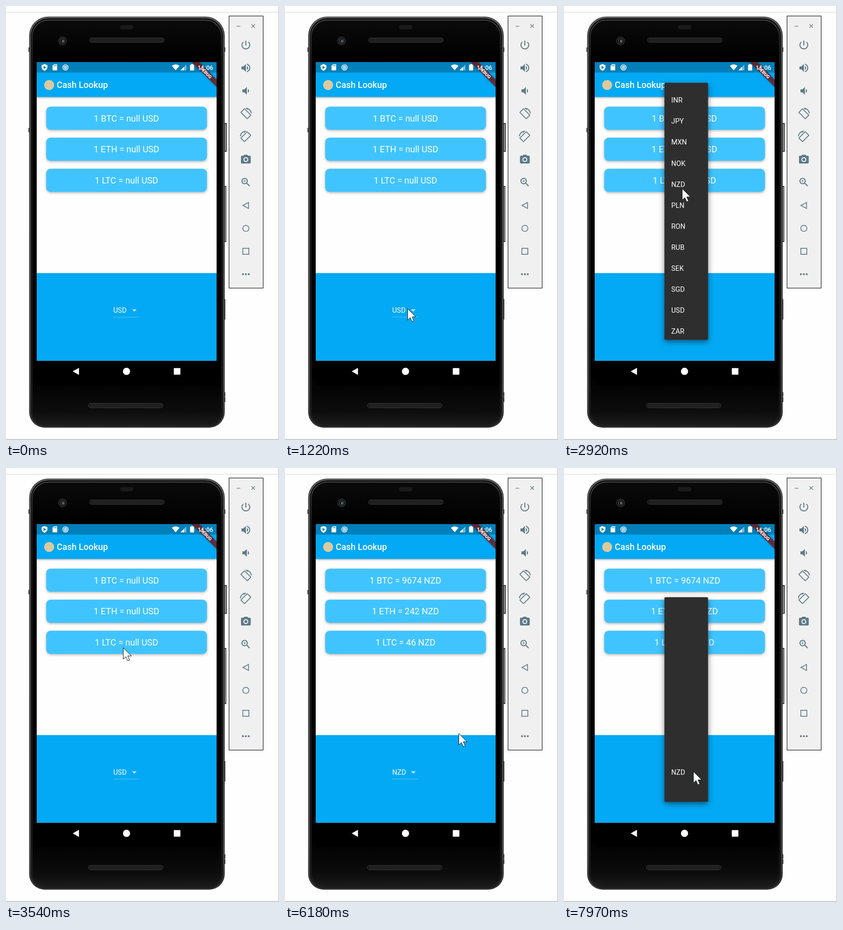
Recreate the animation shown at these times as an HTML page with a canvas. Size 560 by 890 pixels, loop 8000 ms.

```html
<!DOCTYPE html>
<html lang="en">
<head>
<meta charset="utf-8">
<title>Currency app</title>
<style>
html, body { margin: 0; width: 100%; height: 100%; overflow: hidden; background: #fefefe; }
canvas { display: block; }
</style>
</head>
<body>
<canvas id="stage" width="560" height="890"></canvas>
<script>
const W = 560, H = 890, LOOP = 8000, TAU = Math.PI * 2;
const view = document.getElementById('stage').getContext('2d');
const backdrop = document.createElement('canvas');
backdrop.width = W;
backdrop.height = H;
let c = backdrop.getContext('2d');

const BLUE = '#03a9f4', SLATE = '#5c7b88', PANEL = '#2e2e2e';
const CODES = ['INR', 'JPY', 'MXN', 'NOK', 'NZD', 'PLN', 'RON', 'RUB', 'SEK', 'SGD', 'USD', 'ZAR'];
const ROW = 43.1, CARD_GAP = 63.7;

function rect(x, y, w, h, color) {
  c.fillStyle = color;
  c.fillRect(x, y, w, h);
}
function round(x, y, w, h, r, color) {
  c.beginPath();
  c.roundRect(x, y, w, h, r);
  c.fillStyle = color;
  c.fill();
}
function disc(x, y, r, color) {
  c.beginPath();
  c.arc(x, y, r, 0, TAU);
  c.fillStyle = color;
  c.fill();
}
function ring(x, y, r, color, width) {
  c.beginPath();
  c.arc(x, y, r, 0, TAU);
  c.strokeStyle = color;
  c.lineWidth = width;
  c.stroke();
}
function poly(points, fill, stroke, width = 1) {
  c.beginPath();
  points.forEach(([x, y]) => c.lineTo(x, y));
  c.closePath();
  if (fill) { c.fillStyle = fill; c.fill(); }
  if (stroke) { c.strokeStyle = stroke; c.lineWidth = width; c.stroke(); }
}
function line(x1, y1, x2, y2, color, width) {
  c.beginPath();
  c.moveTo(x1, y1);
  c.lineTo(x2, y2);
  c.strokeStyle = color;
  c.lineWidth = width;
  c.stroke();
}
function text(str, x, y, size, align = 'left', weight = 400) {
  c.font = `${weight} ${size}px Roboto, sans-serif`;
  c.textAlign = align;
  c.fillStyle = '#fff';
  c.fillText(str, x, y);
}
function ramp(x1, y1, x2, y2, ...stops) {
  const g = c.createLinearGradient(x1, y1, x2, y2);
  stops.forEach(([at, color]) => g.addColorStop(at, color));
  return g;
}
function at(x, y, draw, angle = 0) {
  c.save();
  c.translate(x, y);
  c.rotate(angle);
  draw();
  c.restore();
}
function shadowed(color, blur, dy, draw) {
  c.save();
  c.shadowColor = color;
  c.shadowBlur = blur;
  c.shadowOffsetY = dy;
  draw();
  c.restore();
}

function grille(x, y) {
  round(x, y, 154, 10, 5, '#3c3c3c');
  round(x + 1, y + 1, 152, 8, 4, '#161616');
  for (let j = 0; j < 3; j++)
    for (let i = 0; i < 49; i++)
      rect(x + 4 + i * 3 + (j % 2) * 1.5, y + 2 + j * 2.4, 1.4, 1.2, '#3f3f3f');
}

function drawPhone() {
  // side buttons and antenna breaks
  round(447, 240, 6, 59, 1, '#3b3b3b');
  rect(449, 242, 2.5, 55, '#959595');
  round(447, 369, 5, 115, 1, '#3b3b3b');
  rect(449, 371, 2, 111, '#909090');
  rect(447, 601, 3, 42, '#444');
  rect(447, 802, 3, 10, '#444');
  [85, 250].forEach(y => rect(46, y, 5, 9, '#4a4a4a'));
  [85, 792].forEach(y => rect(445, y, 5, 9, '#4a4a4a'));

  round(47.5, 21.8, 401.2, 843, [39, 39, 32, 32], '#2c2c2c');
  round(48.5, 22.8, 399.2, 841, [38, 38, 31, 31], ramp(0, 23, 0, 864,
    [0, '#626262'], [.05, '#505050'], [.9, '#484848'], [1, '#333']));
  round(51, 25, 394.2, 837, [36, 36, 29, 29], '#1b1b1b');
  round(52.5, 26.5, 391.2, 834, [34, 34, 28, 28], ramp(0, 26, 0, 862,
    [0, '#0b0b0b'], [.1, '#000'], [.88, '#000'], [.96, '#0c0c0c'], [1, '#1c1c1c']));
  c.beginPath();
  c.roundRect(54, 29, 388, 830, [33, 33, 26, 26]);
  c.strokeStyle = ramp(0, 29, 0, 130, [0, '#777'], [.3, '#444'], [1, '#222']);
  c.lineWidth = 1.2;
  c.stroke();

  round(234, 39, 27, 9, 4, '#1a1a1a');
  disc(116, 71.5, 9, '#2b2b2b');
  disc(116, 71.5, 7, '#0d0f10');
  ring(116, 71.5, 4.5, '#39444a', 1.5);
  disc(117, 72, 2.4, '#5b6a70');
  grille(171, 65);
  grille(168.5, 814.5);
}

function drawStatus() {
  rect(63, 115, 369, 21.5, '#027fb8');
  // shield, card and sync dot
  at(79, 126, () => {
    c.beginPath();
    c.moveTo(0, -7);
    c.lineTo(6, -4.5);
    c.lineTo(6, 0);
    c.quadraticCurveTo(5, 5, 0, 7);
    c.quadraticCurveTo(-5, 5, -6, 0);
    c.lineTo(-6, -4.5);
    c.fillStyle = '#fff';
    c.fill();
    poly([[-2, -3.2], [3.4, 0], [-2, 3.2]], '#027fb8');
  });
  poly([[98.5, 119.5], [105, 119.5], [105, 132], [95.5, 132], [95.5, 122.5]], '#fff');
  for (let i = 0; i < 3; i++) rect(98.3 + i * 2.1, 121, 1.1, 2.6, '#027fb8');
  disc(122, 126, 6.3, '#e6f3f9');
  ring(122, 126, 4.3, '#4b9ccb', 1.6);
  disc(122, 126, 3, '#a9d2e8');
  // wifi, signal, battery
  c.beginPath();
  c.moveTo(348, 132);
  c.lineTo(340.2, 122.6);
  c.quadraticCurveTo(348, 117, 355.8, 122.6);
  c.fillStyle = '#fff';
  c.fill();
  poly([[358, 132], [370, 132], [370, 120]], '#73b9da');
  poly([[358, 132], [365, 132], [365, 125]], '#fff');
  rect(380, 119, 3.6, 2, '#fff');
  round(377.5, 120.2, 8.5, 12, 1, '#fff');
}

function drawBanner() {
  c.save();
  c.beginPath();
  c.rect(63, 115, 369, 72);
  c.clip();
  at(432, 115, () => {
    shadowed('rgba(0,0,0,.5)', 5, 0, () => rect(-36, 25.2, 72, 10.8, 'rgba(0,0,0,.5)'));
    rect(-36, 25.2, 72, 10.8, 'rgba(183,28,28,.5)');
    text('DEBUG', 0, 34, 9.15, 'center', 900);
  }, Math.PI / 4);
  c.restore();
}

function drawApp() {
  rect(63, 115, 369, 613, '#fefefe');
  shadowed('rgba(0,0,0,.34)', 4, 1.5, () => rect(63, 136, 369, 50.5, BLUE));
  drawStatus();
  disc(88.5, 162, 10.3, '#dcca9d');
  text('Cash Lookup', 104, 168, 18, 'left', 500);
  for (let i = 0; i < 3; i++)
    shadowed('rgba(0,0,0,.3)', 5, 1.8, () =>
      round(82.5, 206.4 + i * CARD_GAP, 329.7, 47.4, 9, '#40c4ff'));
  rect(63, 547.7, 369, 180, BLUE);
  poly([[258.5, 622], [268, 622], [263.2, 626.8]], '#c2e8fb');
  rect(220, 637.5, 54, 1, '#5fbfec');
  drawBanner();
  text('11:06', 393, 130.5, 12.6, 'left', 500);

  rect(63, 727.6, 369, 50, '#000');
  poly([[136.8, 749.2], [149.7, 742], [149.7, 756.5]], '#fff');
  disc(247.2, 749.2, 7.4, '#fff');
  round(344.2, 742.5, 13.5, 13.5, 1, '#fff');
}

function icon(y, path, side = 1, edge = 0) {
  at(492, y, () => {
    c.scale(side, 1);
    c.translate(-12, -12);
    const shape = new Path2D(path);
    c.fillStyle = c.strokeStyle = SLATE;
    c.fill(shape, 'evenodd');
    c.lineWidth = edge;
    if (edge) c.stroke(shape);
  });
}

function drawToolbar() {
  rect(457, 20, 71, 559, '#000');
  rect(458, 21, 69, 557, '#f0f0f0');
  line(473, 41.5, 480.5, 41.5, SLATE, 1.2);
  line(503.5, 37.5, 510.5, 44.5, SLATE, 1.2);
  line(510.5, 37.5, 503.5, 44.5, SLATE, 1.2);

  icon(80, 'M13 3h-2v10h2V3zm4.83 2.17l-1.42 1.42C17.99 7.86 19 9.81 19 12c0 3.87-3.13 7-7 7s-7-3.13-7-7c0-2.19 1.01-4.14 2.58-5.42L6.17 5.17C4.23 6.82 3 9.26 3 12c0 4.97 4.03 9 9 9s9-4.03 9-9c0-2.74-1.23-5.18-3.17-6.83z');
  icon(127, 'M3 9v6h4l5 5V4L7 9H3zm13.5 3c0-1.77-1.02-3.29-2.5-4.03v8.05c1.48-.73 2.5-2.25 2.5-4.02zM14 3.23v2.06c2.89.86 5 3.54 5 6.71s-2.11 5.85-5 6.71v2.06c4.01-.91 7-4.49 7-8.77s-2.99-7.86-7-8.77z');
  icon(174, 'M18.5 12c0-1.77-1.02-3.29-2.5-4.03v8.05c1.48-.73 2.5-2.25 2.5-4.02zM5 9v6h4l5 5V4L9 9H5z');
  const turn = 'M16.48 2.52c3.27 1.55 5.61 4.72 5.97 8.48h1.5C23.44 4.84 18.29 0 12 0l-.66.03 3.81 3.81 1.33-1.32zm-6.25-.77c-.59-.59-1.54-.59-2.12 0L1.75 8.11c-.59.59-.59 1.54 0 2.12l12.02 12.02c.59.59 1.54.59 2.12 0l6.36-6.36c.59-.59.59-1.54 0-2.12L10.23 1.75zm4.6 19.44L2.81 9.17l6.36-6.36 12.02 12.02-6.36 6.36z';
  icon(221, turn, 1, .4);
  icon(268, turn, -1, .4);
  icon(315, 'M9 2L7.17 4H4c-1.1 0-2 .9-2 2v12c0 1.1.9 2 2 2h16c1.1 0 2-.9 2-2V6c0-1.1-.9-2-2-2h-3.17L15 2H9zm3 15c-2.76 0-5-2.24-5-5s2.24-5 5-5 5 2.24 5 5-2.24 5-5 5z');
  disc(492, 315, 3, SLATE);
  icon(361.5, 'M15.5 14h-.79l-.28-.27C15.41 12.59 16 11.11 16 9.5 16 5.91 13.09 3 9.5 3S3 5.91 3 9.5 5.91 16 9.5 16c1.61 0 3.09-.59 4.23-1.57l.27.28v.79l5 4.99L20.49 19l-4.99-5zm-6 0C7.01 14 5 11.99 5 9.5S7.01 5 9.5 5 14 7.01 14 9.5 11.99 14 9.5 14zm2.5-4h-2v2H9v-2H7V9h2V7h1v2h2v1z');

  poly([[486, 409], [497.5, 402.8], [497.5, 415.2]], null, SLATE, 1.6);
  ring(492, 456, 6.3, SLATE, 1.6);
  c.strokeRect(485.8, 496.8, 12.4, 12.4);
  [-6, 0, 6].forEach(dx => disc(492 + dx, 550, 2, SLATE));
}

function drawBackdrop() {
  rect(0, 0, W, H, '#fefefe');
  rect(0, 12, 559, 1.5, '#e3e3e3');
  rect(558.5, 0, 1.5, H, '#cfcfcf');
  rect(0, 888, W, 2, '#cacaca');
  drawPhone();
  drawApp();
  drawToolbar();
}

function drawQuotes(t) {
  const loaded = t >= 6180;
  const code = loaded ? 'NZD' : 'USD';
  const values = loaded ? [9674, 242, 46] : [null, null, null];
  ['BTC', 'ETH', 'LTC'].forEach((coin, i) =>
    text(`1 ${coin} = ${values[i]} ${code}`, 247, Math.floor(237 + i * CARD_GAP), 18, 'center'));
  text(code, 220, 629, 14.4);
}

function drawMenu(t) {
  const full = t >= 1770 && t < 3540;
  if (!full && t < 7970) return;
  const top = full ? 157.5 : 265;
  shadowed('rgba(0,0,0,.5)', 12, 4, () => round(206, top, 89.5, 684.5 - top, 2, PANEL));
  if (!full) {
    text('NZD', 220, 629, 14.4);
    return;
  }
  if (t >= 3310) rect(206, 344, 89.5, ROW, 'rgba(255,255,255,.08)');
  CODES.forEach((code, i) => text(code, 220, 198.2 + i * ROW, 14.4));
}

const mix = (a, b, u) => a + (b - a) * u;
const glide = (x1, y1, x2, y2, ease = u => u) => u => [mix(x1, x2, ease(u)), mix(y1, y2, ease(u))];
const smooth = u => u * u * (3 - 2 * u);
const settle = u => 1 - (1 - u) ** 1.7;
const SWEEP = [[346, 514], [318, 495], [274, 518], [238, 574], [225, 602], [216, 612],
  [215, 617], [224, 620], [243, 621], [260, 622], [265, 622]];

// first step, last step, number of steps, path over 0..1
const MOVES = [
  [140, 920, 11, u => glide(424, 858, 253, 621, settle)((u * 11 - 1) / 10)],
  [990, 1070, 2, () => [251, 620]],
  [2310, 2550, 4, glide(251, 620, 243, 380, smooth)],
  [2770, 3160, 6, glide(243, 380, 240, 368, settle)],
  [4390, 4620, 4, glide(240, 368, 356, 544, smooth)],
  [6960, 7740, 11, u => SWEEP[Math.round(u * 11) - 1]]
];
const CLICKS = [[1070, 1220], [3160, 3310], [7740, 7970]];
const ARROW = [[0, 0], [0, 23.5], [5.3, 18.4], [9.2, 27], [13, 25.4], [9.3, 16.9], [16.8, 16.9]];

function pointer(t) {
  const move = MOVES.filter(m => t >= m[0]).pop();
  if (!move) return null;
  const [from, to, steps, path] = move;
  const step = Math.min(steps, 1 + Math.floor((t - from + 4) / ((to - from) / (steps - 1))));
  return path(step / steps).map(Math.round);
}

function drawPointer(t) {
  const tip = pointer(t);
  if (!tip) return;
  const [x, y] = tip;
  at(x + .5, y + .5, () => poly(ARROW, '#fff', '#0c1a14', 1));
  if (CLICKS.some(([a, b]) => t >= a && t < b)) disc(x, y, 18, 'rgba(255,255,0,.47)');
}

drawBackdrop();
c = view;
const start = performance.now();

function frame() {
  const t = (performance.now() - start) % LOOP;
  c.drawImage(backdrop, 0, 0);
  drawQuotes(t);
  drawMenu(t);
  drawPointer(t);
  requestAnimationFrame(frame);
}
frame();
</script>
</body>
</html>
```
